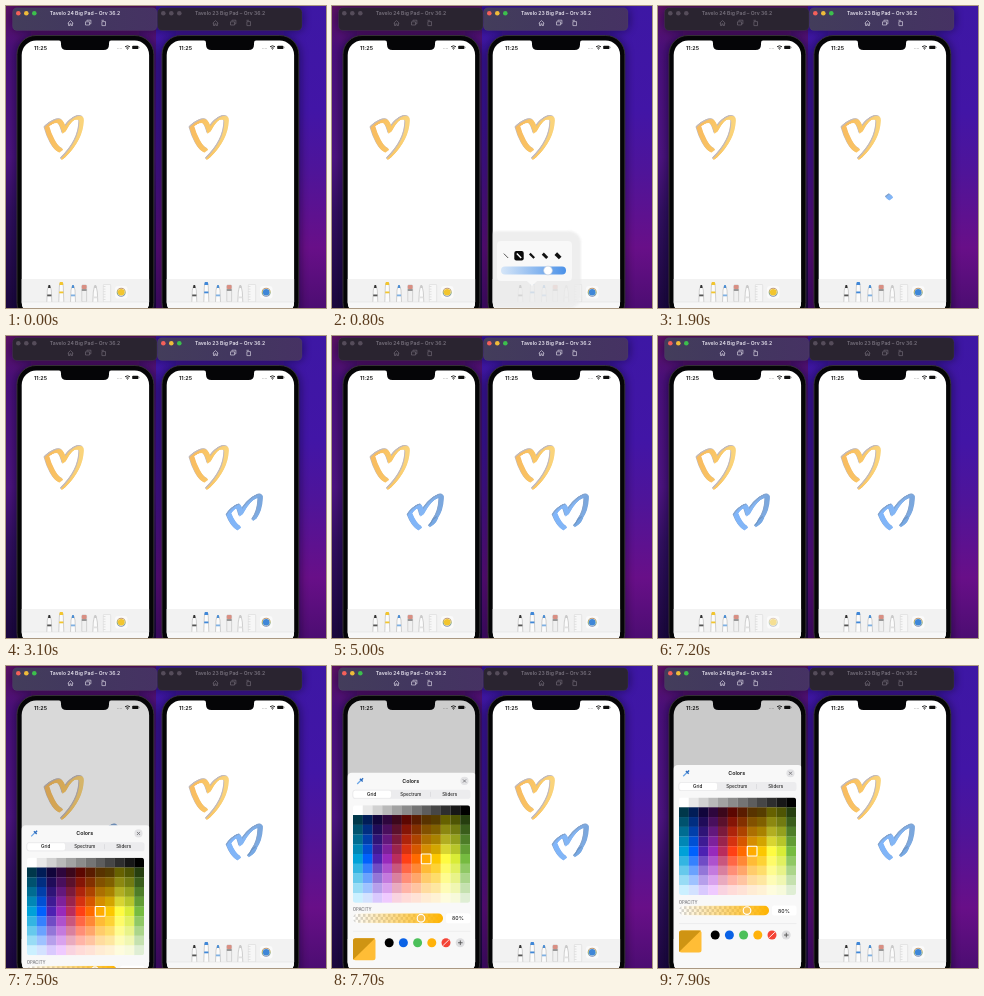
An HTML page for the animation above (8 s loop, 320 by 302 pixels).

```html
<!DOCTYPE html>
<html lang="en">
<head>
<meta charset="utf-8">
<title>Shared drawing</title>
<style>
  html, body { margin: 0; width: 100%; height: 100%; overflow: hidden; background: #2a0a58; }
  svg { display: block; width: 100vw; height: 100vh; }
  text { font-family: Inter, Roboto, sans-serif; text-anchor: middle; }
</style>
</head>
<body>
<svg id="stage" viewBox="0 0 320 302" preserveAspectRatio="none"></svg>
<script>
const LOOP = 8000;
const GAP = 145; // distance between the two devices
const stage = document.getElementById('stage');

const clamp = v => Math.max(0, Math.min(1, v));
const ramp = (t, from, to) => clamp((t - from) / (to - from));
const times = (n, fn) => Array.from({ length: n }, (_, i) => fn(i)).join('');
const rect = (x, y, w, h, fill, r = 0, more = '') =>
  `<rect x="${x}" y="${y}" width="${w}" height="${h}" rx="${r}" fill="${fill}" ${more}/>`;
const dot = (x, y, r, fill, more = '') => `<circle cx="${x}" cy="${y}" r="${r}" fill="${fill}" ${more}/>`;
const line = (d, color, w = 1, more = '') =>
  `<path d="${d}" fill="none" stroke="${color}" stroke-width="${w}" ${more}/>`;
const shape = (d, fill) => `<path d="${d}" fill="${fill}"/>`;
const label = (x, y, size, str, fill = '#111', weight = 500, more = '') =>
  `<text x="${x}" y="${y}" font-size="${size}" fill="${fill}" font-weight="${weight}" ${more}>${str}</text>`;

// Chisel nib: copies of one thin line spread along the nib's slant.
function nibStroke(d, color, edge, nib = 1.5) {
  const spread = (c, dx, dy) => `<g transform="translate(${dx} ${dy})">` + times(7, i => {
    const k = (i - 3) / 3 * nib;
    return line(d, c, 1.5, `pathLength="1" stroke-dasharray="1 2" transform="translate(${k} ${-k * .75})"`);
  }) + '</g>';
  return spread(edge, -.7, -.7) + spread(color, .3, .3);
}

const YELLOW_HEART = 'M55 144.5C49 143 43 130 40.5 120.5C44 117 50 114 53 115C56 117 57 121 58 124.5C61 119 65 113 70 111.7C74 111 75.5 112 75.3 115C75 127 69 140 56.5 152';
const BLUE_HEART = 'M233 192.5C229 190 225 184 222.7 178C225 174 230 170 232 170C234 172 234 175 235 177.5C239 170 245 162.5 251 160.3C254 159.5 254.7 160.5 254.3 163C254 172 251 179 248 183';
const BLUE_TAIL = 'M248.5 182.5C247.5 185 246 187.5 244 189';

function wallpaper() {
  const shade = x => rect(x + 7, 2, 144, 22, '#0a0418', 5) + rect(x + 10, 30, 138, 290, '#0a0418', 19);
  return rect(0, 0, 150, 302, 'url(#skyLeft)') + rect(150, 0, 170, 302, 'url(#skyRight)') +
    `<g filter="url(#shadow)" opacity=".6">${shade(0)}${shade(GAP)}</g>`;
}

function titleBar(id, x, name) {
  const icons = color =>
    line(`M${x + 55.2} 17.2l2.8-2.6 2.8 2.6M${x + 56} 17v2.5h1.4v-1.7h1.2v1.7h1.4V17`, color, .6) +
    line(`M${x + 73} 15.8h4v3.2h-4zM${x + 74.4} 15.2v-1h4v3.6h-1`, color, .6) +
    line(`M${x + 89.4} 15.6h3.6v4h-3.6zM${x + 89} 14.3h2.4`, color, .6);
  const state = (on, fill, text, lamps) => `<g id="${id}${on}">` +
    rect(x, 1.7, 144.5, 22.8, fill, 4.5, 'stroke="#77718a" stroke-opacity=".25" stroke-width=".5"') +
    lamps.map((c, i) => dot(x + 5.8 + i * 8, 7.3, 2.3, c)).join('') +
    label(x + 72.5, 9.2, 5.1, name, text, 600) + icons(text) + '</g>';
  return state('Off', '#2a2430', '#77717d', ['#554c5a', '#554c5a', '#554c5a']) +
    state('On', 'url(#bar)', '#e6e2ee', ['#f4605a', '#eebb3a', '#3cbf4d']);
}

function pen(x, top, tip, band, tipLength = 5, tipHalf = .8) {
  const shoulder = top + tipLength;
  return shape(`M${x - 2.5} 296L${x - 2} ${shoulder}L${x - tipHalf} ${top + 1}H${x + tipHalf}L${x + 2} ${shoulder}L${x + 2.5} 296Z`, '#fbfbfb') +
    line(`M${x - 2.5} 296L${x - 2} ${shoulder}L${x - tipHalf} ${top + 1}M${x + tipHalf} ${top + 1}L${x + 2} ${shoulder}L${x + 2.5} 296`, '#b4b4b4', .6) +
    shape(`M${x - tipHalf - .5} ${top + 3}L${x - tipHalf} ${top}H${x + tipHalf}L${x + tipHalf + .5} ${top + 3}Z`, tip) +
    rect(x - 2.1, shoulder + 4.5, 4.2, 1.8, band);
}

function toolbar(color, id) {
  return rect(15, 273, 130, 40, '#f2f2f2') +
    pen(43.3, 279, '#333', '#555') +
    pen(55.3, 276, color, color, 5, 1.5) +
    pen(67, 279, '#4a8cd2', '#7fb0e2') +
    rect(75.8, 279, 4.8, 17, '#f0f0f0', .8, 'stroke="#b4b4b4" stroke-width=".5"') +
    rect(75.8, 279, 4.8, 4, '#d98f83', 1) + rect(75.8, 283, 4.8, 2, '#969696') +
    pen(89.3, 279, '#c9c9c9', '#e1e1e1', 7) +
    rect(97.3, 278.5, 7.4, 17.5, '#f7f7f7', .6, 'stroke="#d2d2d2" stroke-width=".5"') +
    times(6, i => line(`M97.5 ${280.5 + i * 2.6}h2`, '#bbb', .4)) +
    rect(109, 280, 12.5, 12.5, '#fafafa', 3) +
    `<g id="${id}">` + dot(115.2, 286.2, 4, '#fff', 'stroke="url(#ring)" stroke-width="1.1"') +
    dot(115.2, 286.2, 3.3, color) + '</g>' +
    rect(15, 296, 130, 20, '#f7f7f7') + line('M15 296H145', '#dcdcdc', .5);
}

function statusBar() {
  return label(34.5, 43.6, 5.4, '11:25', '#111', 600) +
    times(4, i => dot(111.5 + i * 1.4, 42.6, .45, '#999')) +
    line('M119 40.8q2.5-2 5 0M120.2 42.2q1.3-1 2.6 0', '#111', .9) + dot(121.5, 43, .6, '#111') +
    rect(126.2, 39.7, 6.2, 3.4, '#111', .9) + rect(132.8, 40.8, .6, 1.3, '#666');
}

function device(content, overlay = '') {
  return rect(11, 29.5, 136.8, 286, '#050507', 19, 'stroke="#3a3b38" stroke-width=".8"') +
    `<g clip-path="url(#screen)">` + rect(15, 34, 130, 280, '#fff') + content + overlay + '</g>' +
    shape('M53 34H105Q103 34.5 103 37V38.5Q103 44 97.5 44H60.5Q55 44 55 38.5V37Q55 34.5 53 34Z', '#050507');
}

function strokeWidthPanel() {
  const slots = times(5, i => {
    const x = 174 + i * 13;
    const chosen = i === 1;
    return (chosen ? rect(x - 4.7, 245, 9.4, 9.6, '#080808', 2) : '') +
      line(`M${x - 2.2} 247.6l4.4 4.4`, chosen ? '#fff' : '#111', .7 + i * .75);
  });
  return rect(154, 225, 95, 77, '#ebebeb', 12, 'filter="url(#soft)" opacity=".85"') +
    shape('M169 235H236Q240 235 240 239V271Q240 275 236 275H205L200 280L195 275H169Q165 275 165 271V239Q165 235 169 235Z', '#f8f8f8') +
    slots + rect(169, 260.5, 65, 8, 'url(#blueFade)', 4) +
    dot(216, 264.5, 4.4, '#fff', 'stroke="#b9c6d8" stroke-width=".6"');
}

const parse = hex => hex.match(/../g).map(h => parseInt(h, 16));
const mix = (a, b, k) => `rgb(${a.map((v, i) => Math.round(v + (b[i] - v) * k))})`;

function colorGrid() {
  const read = list => list.split(' ').map(parse);
  const dark = read('00374a 011d57 11053b 2e063d 3c071b 5c0701 5a1c00 583300 563d00 666100 4f5504 263e0f');
  const pure = read('00a1d8 0061fd 4d22b2 982abc b92d5d ff4015 ff6a00 ffab01 fcc700 fefb41 d9ec37 76bb40');
  const pale = read('cbf0ff d3e2ff d9c9fe efcaff f9d3e0 ffdbd8 ffe2d6 ffecd4 fff2d5 fefcdd f7fadb dfeed4');
  const tone = (c, r) => r === 0 ? mix([255, 255, 255], [0, 0, 0], c / 11)
    : r <= 5 ? mix(dark[c], pure[c], (r - 1) / 4) : mix(pure[c], pale[c], (r - 5) / 4);
  const w = 9.75;
  return '<g clip-path="url(#gridClip)">' + times(120, i => {
    const c = i % 12, r = Math.floor(i / 12);
    return rect(21 + c * w, 32.5 + r * w, w + .15, w + .15, tone(c, r));
  }) + '</g>' + rect(21 + 7 * w, 32.5 + 5 * w, w, w, 'none', .8, 'stroke="#fff" stroke-width="1.1"');
}

function colorSheet() {
  const presets = ['#000', '#0a62e6', '#4cc05a', '#ffb20a', '#f44336', '#dedee0'];
  return rect(15, 0, 130, 240, '#f8f8f8', 5) +
    line('M25.2 11.2l4-4', '#6aa5e6', 1.2) + line('M27.9 6l2.8 2.8M29.4 7.2l1.7-1.7', '#2f6fc0', 1.4) +
    label(78.7, 9.8, 5.3, 'Colors', '#111', 600) +
    dot(132.5, 8.2, 4.1, '#e3e3e5') + line('M131 6.7l3 3M134 6.7l-3 3', '#77777b', .9) +
    rect(20.5, 17, 118, 9, '#ececee', 2.6) + rect(21, 17.5, 38.5, 8, '#fff', 2.3, 'stroke="#ddd" stroke-width=".4"') +
    line('M98.5 19v5', '#cfcfd2', .5) +
    ['Grid', 'Spectrum', 'Sliders'].map((s, i) => label(39.7 + i * 39, 23, 4.5, s, '#222', i ? 500 : 600)).join('') +
    colorGrid() +
    label(20.7, 138.5, 4.3, 'OPACITY', '#8a8a8e', 600, 'style="text-anchor:start"') +
    '<g clip-path="url(#opacityClip)">' + rect(21, 140.5, 90, 10, '#fff') +
    times(57, i => rect(21 + (i % 19) * 5 + (Math.floor(i / 19) % 2) * 2.5, 141.2 + Math.floor(i / 19) * 2.9, 2.5, 2.9, '#d5d5d5')) +
    rect(21, 140.5, 90, 10, 'url(#amberFade)') + '</g>' +
    dot(89, 145.5, 3.8, '#f8c252', 'stroke="#fff" stroke-width="1.2"') +
    rect(114, 140.5, 24.5, 10, '#fff', 2.5) + label(126, 147.6, 5.2, '80%', '#222') +
    line('M21 158.5H138.5', '#e0e0e2', .5) +
    rect(21, 165.5, 22.5, 22, '#ffbd36', 2.5) +
    shape('M23.5 165.5H43L21 187V168Q21 165.5 23.5 165.5Z', '#cf9413') +
    presets.map((c, i) => dot(57.2 + i * 14.2, 170, 4.5, c)).join('') +
    line('M111.2 172.6l5.6-5.4', '#fff', .9) + line('M126 170h4.6M128.3 167.7v4.6', '#555', .9);
}

const stops = (...list) => list.map(([at, c, o = 1]) => `<stop offset="${at}" stop-color="${c}" stop-opacity="${o}"/>`).join('');
const gradient = (id, dir, ...list) => `<linearGradient id="${id}" ${dir === 'v' ? 'x2="0" y2="1"' : ''}>${stops(...list)}</linearGradient>`;
const clip = (id, inner) => `<clipPath id="${id}">${inner}</clipPath>`;
const blur = (id, size) => `<filter id="${id}" x="-20%" y="-20%" width="140%" height="140%"><feGaussianBlur stdDeviation="${size}"/></filter>`;

const blueHeart = side => `<g id="${side}Heart">${nibStroke(BLUE_HEART, 'url(#blueInk)', '#83a4cf')}</g>` +
  `<g id="${side}Tail">${nibStroke(BLUE_TAIL, '#78a9e4', '#6f96c6', 1.9)}</g>`;
const yellowHeart = nibStroke(YELLOW_HEART, 'url(#yellowInk)', '#c3bab9');

stage.innerHTML = '<defs>' +
  gradient('skyLeft', 'v', [0, '#5c1265'], [.15, '#4a107c'], [.5, '#4d1482'], [.68, '#321062'], [1, '#1c0840']) +
  gradient('skyRight', 'v', [0, '#3d17a4'], [.35, '#4215a6'], [.55, '#4f1499'], [.8, '#680f88'], [1, '#4c0d72']) +
  gradient('bar', 'h', [0, '#433d5b'], [.5, '#42375f'], [1, '#463263']) +
  gradient('blueInk', 'h', [0, '#7fb5fa'], [.5, '#85b6f3'], [1, '#7aa6dc']) +
  gradient('yellowInk', 'h', [0, '#f8bc60'], [.5, '#fac766'], [1, '#fad47c']) +
  gradient('blueFade', 'h', [0, '#d6e6f8'], [1, '#4b91e8']) +
  gradient('amberFade', 'h', [0, '#ffb400', 0], [1, '#ffb400']) +
  gradient('ring', 'v', [0, '#c39a76'], [.4, '#b9ad62'], [.7, '#7fa887'], [1, '#8590b4']) +
  clip('screen', rect(15.7, 34.6, 127.4, 275.5, '#fff', 14.5)) +
  clip('gridClip', rect(21, 32.5, 117, 97.5, '#fff', 2.5)) +
  clip('opacityClip', rect(21, 140.5, 90, 10, '#fff', 5)) +
  blur('soft', 1.1) + blur('shadow', 5) + '</defs>' +
  wallpaper() +
  device(yellowHeart + `<g transform="translate(${-GAP} 0)">${blueHeart('left')}</g>` + toolbar('#f2c52e', 'leftWell') + statusBar(),
    rect(15, 34, 130, 280, '#000', 0, 'id="dim"') + `<g id="sheet">${colorSheet()}</g>`) +
  `<g transform="translate(${GAP} 0)">` +
  device(yellowHeart + `<g transform="translate(${-GAP} 0)">${blueHeart('right')}</g>` +
    toolbar('#3f87d8', 'rightWell') + statusBar(),
    `<g id="panel" transform="translate(${-GAP} 0)">${strokeWidthPanel()}</g>`) + '</g>' +
  titleBar('right', 151.5, 'Tavelo 23 Big Pad – Orv 36.2') +
  titleBar('left', 6.5, 'Tavelo 24 Big Pad – Orv 36.2');

const el = id => document.getElementById(id);
const fade = (id, v) => el(id).setAttribute('opacity', v);
const show = (id, on) => el(id).setAttribute('display', on ? 'inline' : 'none');

function drawn(id, progress) {
  show(id, progress > 0);
  el(id).querySelectorAll('path').forEach(p => p.setAttribute('stroke-dashoffset', 1 - progress));
}

function update(t) {
  const leftActive = t < 100 || t >= 7200;
  show('leftOn', leftActive);
  show('leftOff', !leftActive);
  show('rightOn', !leftActive);
  show('rightOff', leftActive);

  fade('panel', ramp(t, 400, 700) * (1 - ramp(t, 1500, 1800)));

  drawn('rightHeart', ramp(t, 1850, 2850));
  drawn('rightTail', ramp(t, 3550, 3800));
  drawn('leftHeart', t >= 3700 ? 1 : 0);
  drawn('leftTail', t >= 4600 ? 1 : 0);

  fade('leftWell', t >= 7200 && t < 7400 ? .5 : 1);

  // Critically damped spring brings the sheet up.
  const s = Math.max(0, t - 7300) * .0124;
  const rise = 1 - Math.exp(-s) * (1 + s);
  fade('dim', .21 * rise);
  el('sheet').setAttribute('transform', `translate(0 ${310 - 212 * rise})`);
}

const start = performance.now();
function tick() {
  update((performance.now() - start) % LOOP);
  requestAnimationFrame(tick);
}
update(0);
requestAnimationFrame(tick);
</script>
</body>
</html>
```
